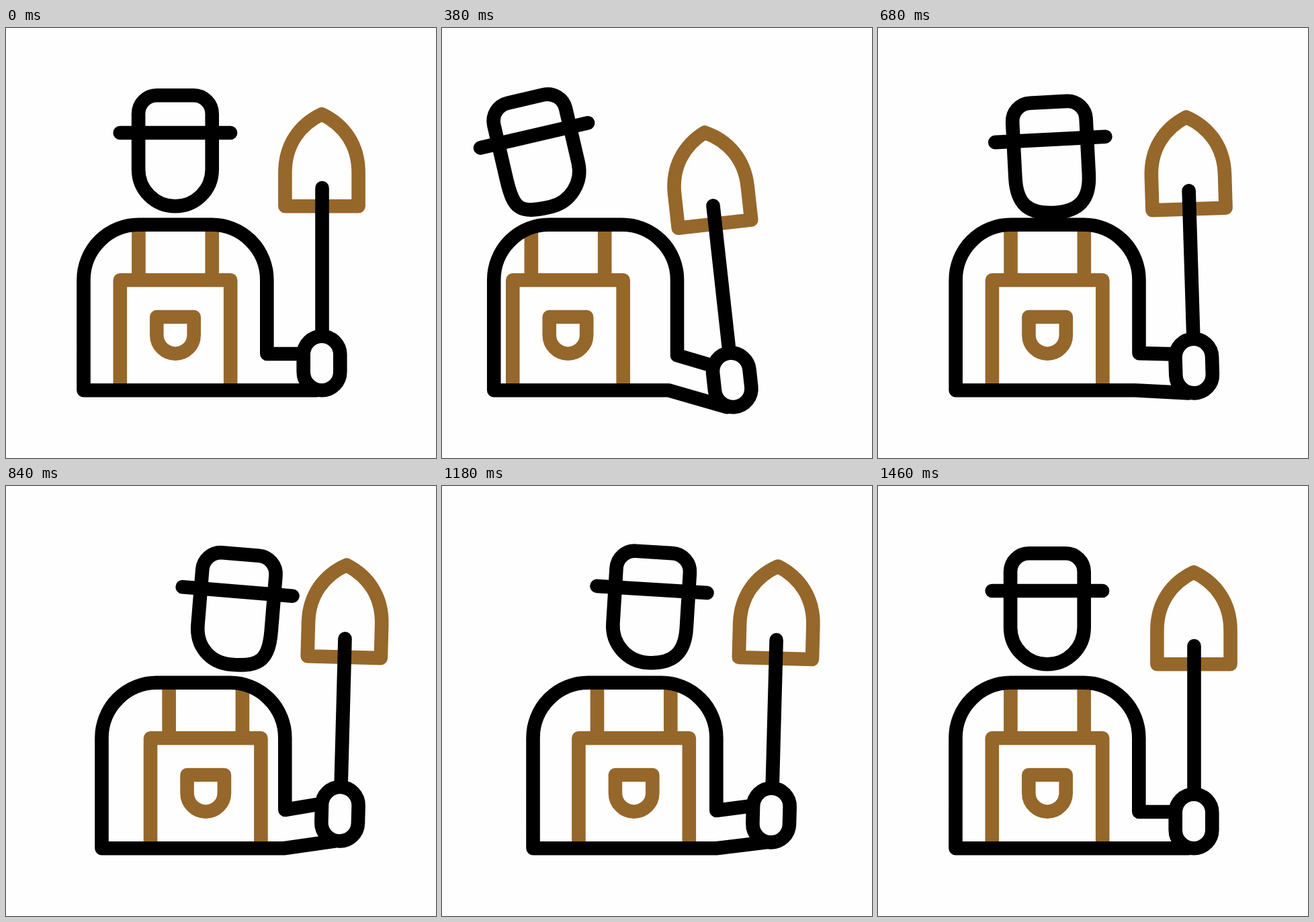
An HTML page with a canvas for the animation above (2400 ms loop, 640x640 px).

```html
<!DOCTYPE html>
<html lang="en">
<head>
<meta charset="utf-8">
<title>Gardener</title>
<style>
  html, body { margin: 0; width: 100%; height: 100%; overflow: hidden; background: #fefefe; }
  canvas { display: block; width: 640px; height: 640px; }
</style>
</head>
<body>
<canvas id="stage" width="640" height="640"></canvas>
<script>
const ctx = document.getElementById('stage').getContext('2d');
const BLACK = '#000', BROWN = '#96672a', PAPER = '#fefefe';
const LOOP = 2400, STEP = 20;
const LEFT_AT = 424, RIGHT_AT = 913, REST_AT = 1459;

const soften = s => s + 0.5 * (s * s * (3 - 2 * s) - s);
const linear = s => s;

// Returns a function mixing a left-lean and a right-lean value; rest is 0.
function sway(t, ease) {
  let left = 0, right = 0;
  if (t < LEFT_AT) {
    left = ease(t / LEFT_AT);
  } else if (t < RIGHT_AT) {
    right = ease((t - LEFT_AT) / (RIGHT_AT - LEFT_AT));
    left = 1 - right;
  } else if (t < REST_AT) {
    right = 1 - ease((t - RIGHT_AT) / (REST_AT - RIGHT_AT));
  }
  const mix = (l, r) => left * l + right * r;
  mix.dip = 4 * left * right;
  return mix;
}

function stroke(color, d, cap = 'round') {
  ctx.strokeStyle = color;
  ctx.lineCap = cap;
  ctx.stroke(new Path2D(d));
}

function placed(x, y, degrees, draw) {
  ctx.save();
  ctx.translate(x, y);
  ctx.rotate(degrees * Math.PI / 180);
  draw();
  ctx.restore();
}

function drawApron(dx) {
  placed(dx, 0, 0, () => {
    stroke(BROWN, 'M197.4 293V375M306.7 293V375', 'butt');
    stroke(BROWN, 'M169.8 539V375.2H334.2V539', 'butt');
    stroke(BROWN, 'M224.3 430H279.7V457A27.7 27.7 0 0 1 224.3 457Z');
  });
}

function drawBody(mix, dx) {
  const wristX = 440 + dx, wristY = 485 + mix(19.5, -17);
  const elbowY = 485 + mix(2.5, -4);
  const bendX = 388 + mix(-56, 40);
  const handX = 462 + dx, handY = 539.3 + mix(27.8, -17.5);
  stroke(BLACK, `M${handX} ${handY}L${bendX} 539.3H${115.5 + dx}V375
    A82 82 0 0 1 ${197.5 + dx} 292.8H${306.3 + dx}A82 82 0 0 1 ${388.3 + dx} 375
    V${elbowY}L${wristX} ${wristY}`);
}

// Origin at the middle of the hand grip.
function drawShovel() {
  stroke(BROWN, `M-54.6 -233.7V-284C-54.6 -325 -33 -355 0 -370.7
    C33 -355 54.6 -325 54.6 -284V-233.7Z`);
  stroke(BLACK, 'M0.5 -261V-41');
  ctx.fillStyle = PAPER;
  const grip = 'M-27.3 -13A27.3 27.3 0 0 1 27.3 -13V13A27.3 27.3 0 0 1 -27.3 13Z';
  ctx.fill(new Path2D(grip));
  stroke(BLACK, grip);
}

// Origin at the chin; the jaw values square off each lower corner.
function drawHead(jawLeft, jawRight) {
  stroke(BLACK, `M-54.8 -55.6V-138.3A27.4 27.4 0 0 1 -27.4 -165.7H27.4
    A27.4 27.4 0 0 1 54.8 -138.3V-55.6
    C54.8 ${-55.6 + jawRight} ${jawRight} -0.8 0 -0.8
    C${-jawLeft} -0.8 -54.8 ${-55.6 + jawLeft} -54.8 -55.6Z`);
  stroke(BLACK, 'M-82.2 -110H82.2');
}

function render(t) {
  const body = sway(t, linear), head = sway(t, soften);
  const dx = body(-42.7, 39.2);
  ctx.fillStyle = PAPER;
  ctx.fillRect(0, 0, 640, 640);
  ctx.lineWidth = 20.6;
  ctx.lineJoin = 'round';

  drawApron(body(-72, 65.8));
  drawBody(body, dx);
  placed(470 + dx, 499 + body(27.8, -17.5), body(-7.05, 3.05), drawShovel);
  placed(251.9 + head(-96.4, 104.7), 266 + head(1, -4.3) + 11.6 * head.dip, head(-14, 6.9),
    () => drawHead(30.3 + head(18, 0), 30.3 + head(0, 14)));
}

let start;
function tick(now) {
  start ??= now;
  const t = (now - start) % LOOP;
  render(Math.floor(t / STEP) * STEP);
  requestAnimationFrame(tick);
}
render(0);
requestAnimationFrame(tick);
</script>
</body>
</html>
```
